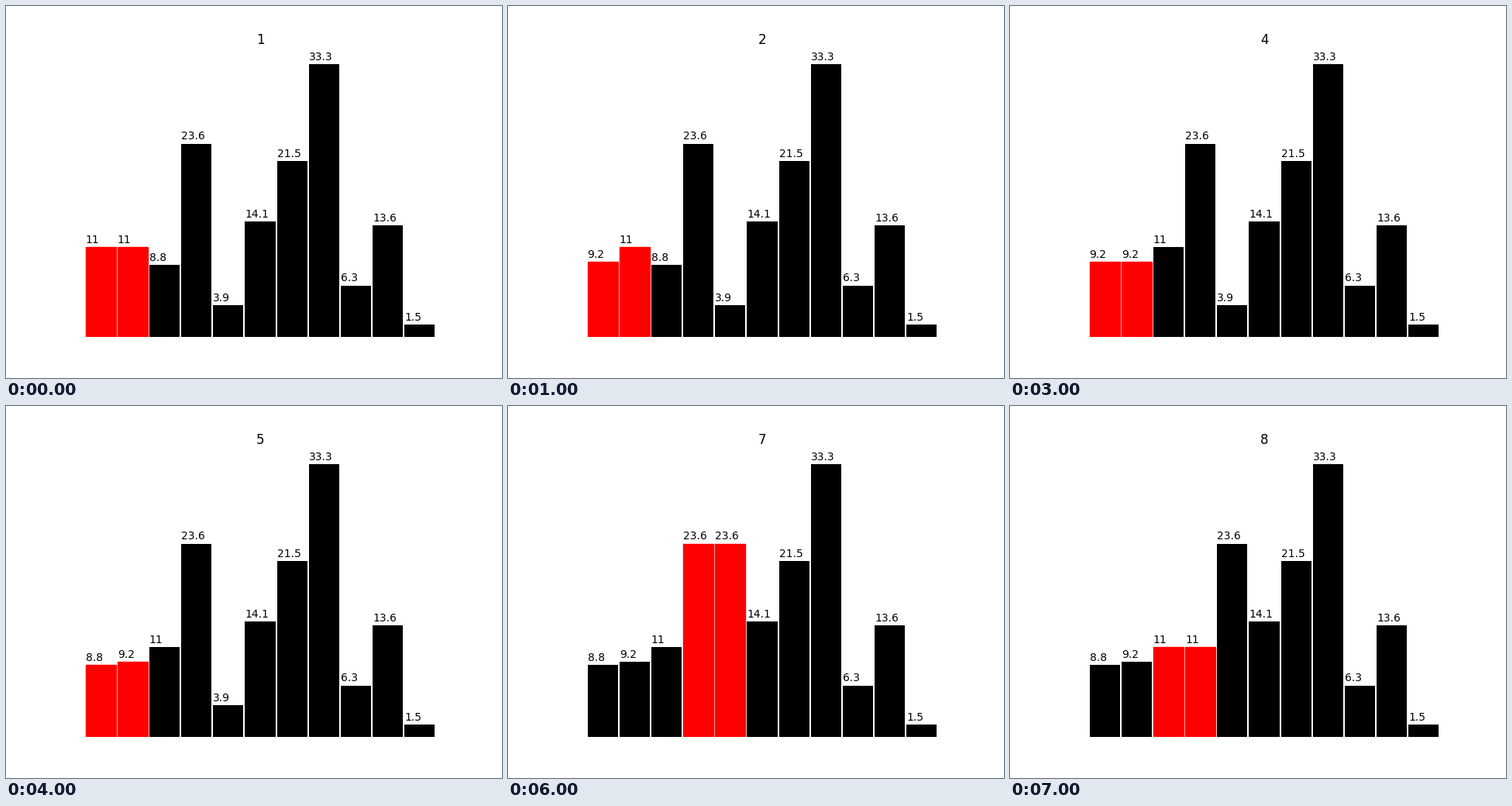
Write a matplotlib script that moves like this. It is 640 px wide and 480 px high and loops after 8000 ms.

```python
from itertools import islice

import matplotlib.pyplot as plt
from matplotlib.animation import FuncAnimation

VALUES = [11, 9.2, 8.8, 23.6, 3.9, 14.1, 21.5, 33.3, 6.3, 13.6, 1.5]
STEPS = 8
LABEL_GAP = 0.5


def insertion_sort(values):
    """Yield the list and the active left index after every write."""
    data = list(values)
    for i in range(1, len(data)):
        key = data[i]
        j = i
        while j > 0 and data[j - 1] > key:
            data[j] = data[j - 1]
            j -= 1
            yield list(data), j
        data[j] = key
        yield list(data), j


states = list(islice(insertion_sort(VALUES), STEPS))

plt.rcParams["font.family"] = "DejaVu Sans"
fig, ax = plt.subplots(figsize=(6.4, 4.8), dpi=100)


def draw(step):
    data, active = states[step]
    ax.clear()
    ax.axis("off")
    bars = ax.bar(range(len(data)), data, width=0.95, color="black")
    for bar in bars[active:active + 2]:
        bar.set_color("red")  # also colours the outline
    for bar, value in zip(bars, data):
        ax.text(bar.get_x(), value + LABEL_GAP, f"{value:g}", fontsize=10)
    ax.set_title(str(step + 1), fontsize=12)


anim = FuncAnimation(fig, draw, frames=STEPS, init_func=lambda: draw(0),
                     interval=1000, repeat=True, repeat_delay=0)
plt.show()
```
